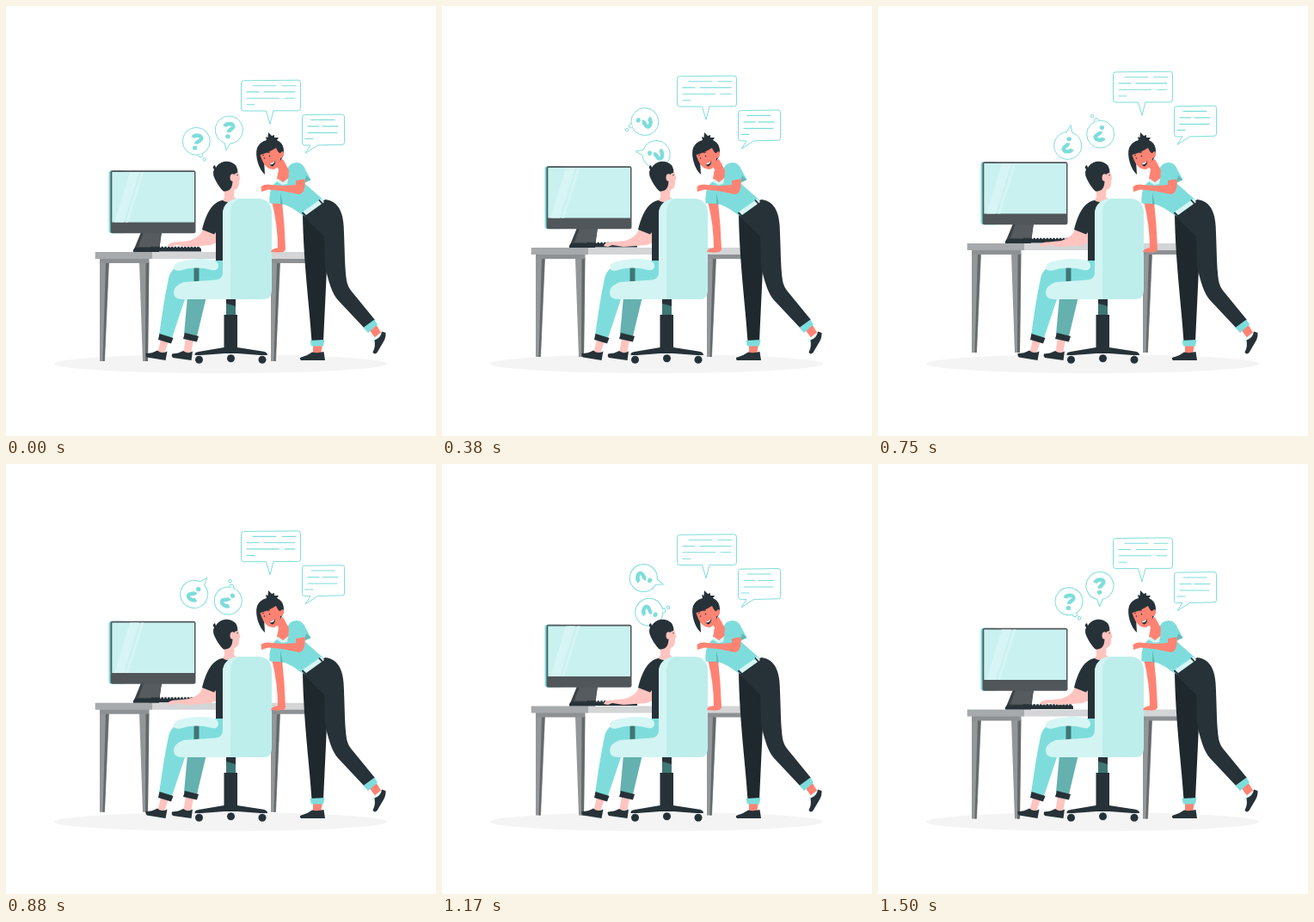
Recreate the animation shown at these times as an HTML page. Size 500x500 px, loop 1540 ms.

```html
<!DOCTYPE html>
<html lang="en">
<head>
<meta charset="utf-8">
<title>Office conversation</title>
<style>
  html, body { margin: 0; width: 100%; height: 100%; overflow: hidden; background: #fff; }
  svg { display: block; width: 100vw; height: 100vh; }
  .outline { fill: #fff; stroke: #7edddb; stroke-width: 1; stroke-linejoin: round; }
  .lines { fill: none; stroke: #7edddb; stroke-width: 1.1; stroke-linecap: round; }
  .dark { fill: #263238; }
  .teal { fill: #7edddc; }
  .skin { fill: #ffc4bf; }
  .coral { fill: #ff8373; }
</style>
</head>
<body>
<svg viewBox="0 0 500 500">
  <defs>
    <g id="question">
      <path d="M-5.2-4.6C-3.2-8.6 5.2-8.3 4.8-4.2C4.4-1-.6-1-.6 2.6" fill="none" stroke="#7edddb" stroke-width="4.500"/>
      <ellipse cx="-1.6" cy="7.2" rx="2.8" ry="2.5" fill="#7edddb"/>
    </g>
    <g id="leg">
      <path fill="#939799" d="M0 298H11L6 413H0Z"/>
      <path fill="#64696b" d="M7 298H10.500L5.500 413H3.500Z"/>
    </g>
  </defs>

  <ellipse cx="249.500" cy="416" rx="193.500" ry="11" fill="#f4f4f4"/>

  <g class="bob">
    <!-- desk -->
    <use href="#leg" x="109"/>
    <use href="#leg" x="308"/>
    <path fill="#939799" d="M155 298H166L165 413H159Z"/>
    <path fill="#64696b" d="M162.500 298H166.500L165 413H162Z"/>
    <path fill="#8d9193" d="M109 293H166.500V299H109ZM308 293H348V299H308Z"/>
    <path fill="#d3d5d6" d="M168 286H349V294H168Z"/>
    <path fill="#a6aaac" d="M103.700 286H170V294H103.700Z"/>
    <!-- monitor -->
    <path fill="#3c4346" d="M157 263H181L178 285H148Z"/>
    <path fill="#555b5e" d="M160 263H181L178 280H154Z"/>
    <path class="dark" d="M148 283.500L150 281H178V286H148Z"/>
    <g transform="translate(0 .7)">
      <rect class="teal" x="119.500" y="190.500" width="20" height="73" rx="3"/>
      <rect fill="#505659" x="121.500" y="190.500" width="99" height="73" rx="2.500"/>
      <path fill="#c9f1f0" d="M123.300 192.200H219V250.700H123.300Z"/>
      <path fill="#d7f5f4" d="M144 192.200H155L137 250.700H126ZM157.500 192.200H160.500L142 250.700H139Z"/>
    </g>
    <!-- keyboard -->
    <path class="dark" d="M168 281H225Q227 281 227 284V285.500H166V283Z"/>
    <path d="M169 280.500H225" stroke="#263238" stroke-width="1.600" stroke-dasharray="2.600 1.200"/>
  </g>

  <!-- thought bubbles -->
  <g id="thoughts">
    <path class="outline" d="M254.200 159.200L256 168L260.500 160A16 16 0 1 0 254.200 159.200Z"/>
    <use href="#question" x="259.500" y="144.500"/>
    <circle class="outline" cx="221.300" cy="157.300" r="16"/>
    <path class="outline" d="M223 173.200Q224.500 177 227.500 175.600Q229.500 174 228 171.800"/>
    <circle class="outline" cx="230.800" cy="178.300" r="1.700"/>
    <use href="#question" transform="translate(222 158) rotate(6)"/>
  </g>

  <!-- seated man -->
  <g>
    <path fill="#64b1af" d="M211 338H233L222 384L207 382Z"/>
    <path class="skin" d="M209 387L218 389L215 404H206Z"/>
    <path class="dark" d="M208 380L224 384L222 390.500L206 387Z"/>
    <path class="dark" d="M193 404.500Q201 404 206 401Q211 405 217 401.500L215.500 412L194 409Q192 407 193 404.500Z"/>
    <path class="teal" d="M252 296H220C205 299 192 303 189 317C184 340 181 362 178 383L193 386L208 341H252Z"/>
    <path class="skin" d="M180 388L189 390L184 404H176Z"/>
    <path class="dark" d="M178.500 381L194.500 386L192 392.500L177 388Z"/>
    <path class="dark" d="M162.500 404Q170 404 176 400.500Q181 405 187.500 401.500L185.500 412L164 408.500Q162 407 162.500 404Z"/>
    <path class="skin" d="M229 259C227 266 222 270 213 273L198 274.500C192 274.500 189 276 188 279L193 280L198 278L211 280L238 278L245 275V261Z"/>
    <path class="dark" d="M245 228.500C236 234 231 248 228 260L242 265.500L244 263V296H265V225.500C256 225 250 225 245 228.500Z"/>
    <path class="skin" d="M254 209H266L265 222L271 226C265 229 256 229 252 226L254 222Z"/>
    <path class="skin" d="M256 192H270Q271 196 272.500 201L271 203C271.500 209 270 213 265 214H256Z"/>
    <path class="dark" d="M242 190Q239 187 243 185L244 188C248 180 260 178 267 185Q270 190 269 194L266 195L264 200L263 208C262 213 259 215.500 253 215.500C248 211 244 204 242 199Q240 194 242 190Z"/>
    <ellipse class="skin" cx="263.500" cy="199.500" rx="3" ry="4.300"/>
    <path d="M268 197L270 196.200" stroke="#263238" stroke-width=".7"/>
  </g>

  <!-- chair -->
  <g>
    <path fill="#3f7775" d="M218.500 304H224.500V323H218.500ZM256 340H267V360H256Z"/>
    <path class="dark" d="M256 340H267V349L256 346Z"/>
    <path class="dark" d="M253.500 359H269V397L298 401.500Q304 402 304 406H296L269 404H254L227 406H219.500Q219 402.500 224 402L253.500 397Z"/>
    <g class="dark">
      <circle cx="224.500" cy="411.300" r="4.500"/><circle cx="261.500" cy="409.800" r="4.500"/><circle cx="298" cy="411.300" r="4.500"/>
    </g>
    <path fill="#bdeeec" d="M252 242C252 231 260 224 270 224H293C303 224 309 230 309 241V331Q309 341 299 341H252Z"/>
    <path fill="#d2f4f3" d="M252 310V242C252 230 261 224 273 223.500C265 226 261 231 261 242V341H205Q195 341 195 333Q195 325 207 321L244 318.500Q252 317 252 310Z"/>
    <path fill="#d6f6f5" d="M200 298Q220 292 239 295Q248 297 247 303Q246 308 240 307Q219 302 203 307.500Q196 309 195 304Q195 300 200 298Z"/>
  </g>

  <!-- standing woman -->
  <g>
    <path class="coral" d="M309 227L321 228L323.500 254L325 283Q324 287 316 286.500L308 286Q308 282.500 316 281Q316 255 309 227Z"/>
    <path class="coral" d="M422 376L430 370L437 381L430 387Z"/>
    <path fill="#e8f8f8" d="M424 389L438 378L436 389L430 394Z"/>
    <path class="dark" d="M428.500 388.500Q436 386 437 378.500L441.500 380Q442 386 438 392L431.500 403Q428.500 406 426.500 402.500Q430 396 428.500 388.500Z"/>
    <path class="coral" d="M357 393H368L366 405H357Z"/>
    <path class="dark" d="M342 409Q350 407 356 402.500Q362 404 369.500 402L371 412H343Q341.500 411 342 409Z"/>
    <path fill="#1e282d" d="M345 243L372 252L373 305L369 390H355.500C353 350 346 300 345 243Z"/>
    <path class="dark" d="M345 244L371 225C388 227 393 242 393 264C394 290 394 305 396 319Q397 326 402 332L429 365L418 376L386 342C379 334 375 320 371 303L370 268Z"/>
    <path class="teal" d="M353.500 389L370.500 388L369 395.500H355ZM415.500 374L428.500 364.500L432 370.500L421 380Z"/>
    <path class="teal" d="M331 184Q343 178 348 190L354.500 202L347 206L369 225.500L345 243.500C337 237 328 232 321 230L306.500 229.500C306 217 308 209 315 204Z"/>
    <path fill="#62b9b7" d="M319 217L322 231L319 230.300ZM349 197L354.500 202L347 205Z"/>
    <path fill="#d6f6f5" d="M344 240L367 224L370 228L347 244.500Z"/>
    <path d="M344.500 240L348.500 244M364 225.500L368 230" stroke="#263238" stroke-width="1.800"/>
    <path class="coral" d="M337 203L347.500 201C348 210 347 218 341 219L321 215L305 213.500L297 216L296.500 210Q301 206.500 309 208L323 209L337 208Z"/>
    <path class="coral" d="M312 183L322 178L329 191L328 204L321 206L315 201L317 190Z"/>
    <path fill="#d6f6f5" d="M316.500 201L322 205L328.500 200L327 207L321 208L314.500 204Z"/>
    <path class="dark" d="M292 165C295 159 299 157 303 156L302 152L304.500 153L305 147L309 151L312 150L312 153L317 153L315 156C323 159 325 169 321 177L315 186H304L300 179L301 196C294 190 289 174 292 165Z"/>
    <path class="coral" d="M295.500 173C304 171 309 168 314 165C316 169 317 171 319 171Q322 167 323 171Q323 177 319 177C319 184 316 189 311 190C302 190 298 181 295.500 173Z"/>
    <path d="M298 174L300 173M304 170.800L307 170" stroke="#263238" stroke-width=".8"/>
    <path class="dark" d="M306.500 183.500Q311 182.500 312.500 179.500Q314 184 310 186.500Q307.500 186.500 306.500 183.500Z"/>
    <path fill="#fff" d="M307 183.300Q311 182.300 312.300 180Q312.300 184 307.500 184.500Z"/>
    <circle class="dark" cx="300.500" cy="177" r=".8"/><circle class="dark" cx="306.500" cy="174.500" r=".8"/>
  </g>

  <!-- speech bubbles -->
  <g class="bob">
    <g transform="translate(0 .5)">
      <path class="outline" d="M276.500 86.300L339.500 85.700Q342.500 85.700 342.500 88.700V118.300Q342.500 121.300 339.500 121.300H311L307 136.700L302.500 121.500H276.500Q273.500 121.500 273.500 118.500V89.300Q273.500 86.300 276.500 86.300Z"/>
      <path class="lines" d="M287 92.200H314M321 92.200H337M280 99.400H294M300 99.400H336M280 106.700H317.500M324 106.700H336M280 114.200H289"/>
      <path class="outline" d="M347.500 126.100L391 125.500Q393.500 125.500 393.500 128.200V158Q393.500 160.700 391 160.700L362.500 161.400L348 170.700L354 161.400H347.500Q344.500 161.400 344.500 158.400V128.700Q344.500 126.100 347.500 126.100Z"/>
      <path class="lines" d="M355 131.900H382M351 139.400H364M368 139.400H386M351 146.900H385M348 153.900H357"/>
    </g>
  </g>
</svg>
<script>
  const LOOP = 1540, STEP = 41.6;
  const bobbing = document.querySelectorAll('.bob');
  const thoughts = document.getElementById('thoughts');

  function draw(now) {
    const step = Math.floor((now % LOOP + 3) / STEP);
    const angle = Math.min(step * 10, 352.5);
    const rise = 10 * (1 - Math.abs(angle / 180 - 1));
    for (const part of bobbing) part.setAttribute('transform', `translate(0 ${-rise})`);
    thoughts.setAttribute('transform', `rotate(${angle} 240 153.2)`);
  }

  let start;
  function tick(now) {
    start ??= now;
    draw(now - start);
    requestAnimationFrame(tick);
  }
  draw(0);
  requestAnimationFrame(tick);
</script>
</body>
</html>
```
